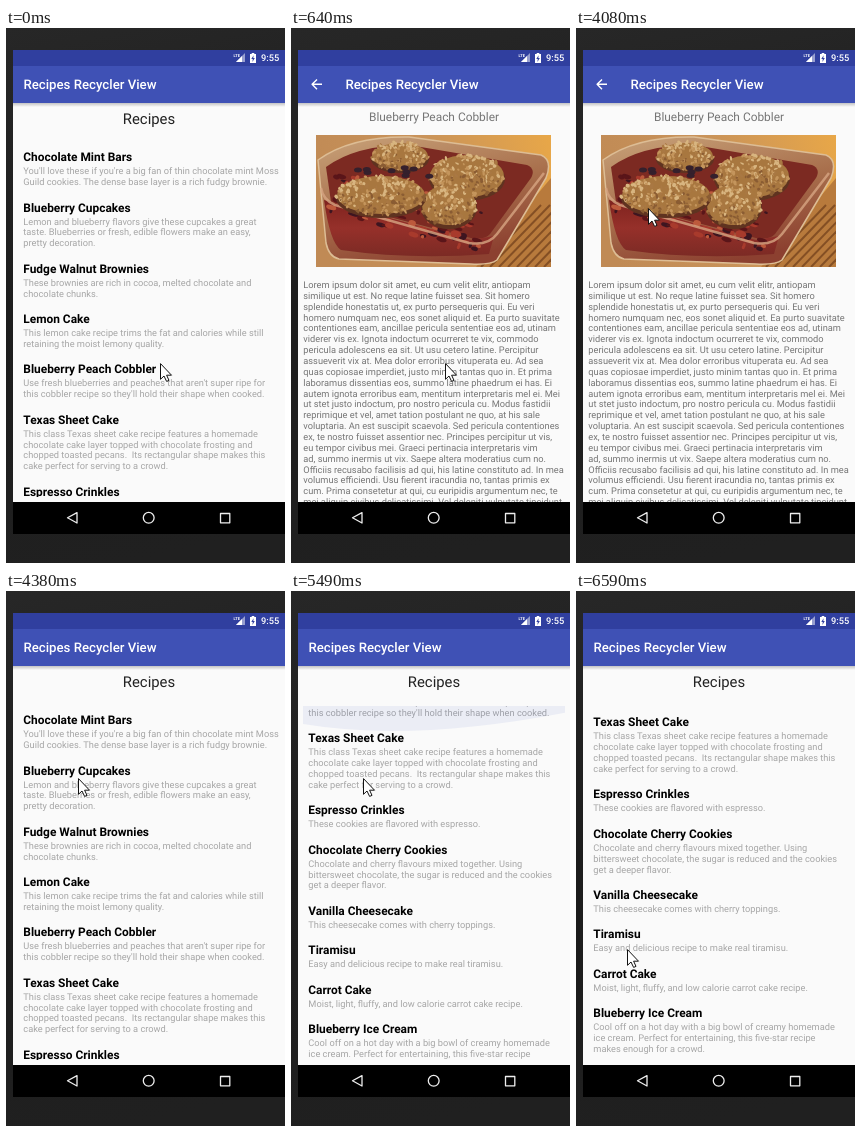
Write an HTML page with a canvas that moves like this. It is 279 px wide and 535 px high and loops after 8 s.

```html
<!DOCTYPE html>
<html lang="en">
<head>
<meta charset="utf-8">
<title>Recipes</title>
<style>
html, body { margin: 0; width: 100%; height: 100%; overflow: hidden; background: #202020; }
canvas { display: block; }
</style>
</head>
<body>
<canvas id="stage" width="279" height="535"></canvas>
<script>
const W = 279, H = 535, LOOP = 8000;
const DP = 0.6618;
const LINE = 14 * 1.172 * DP;
const SCREEN = { x: 7, top: 22, bottom: 474, w: 272 };
const LIST = { x: 12, y: 115, w: 262, h: 354 };
const SCROLL_END = 260.4;

const recipes = `Chocolate Mint Bars
You'll love these if you're a big fan of thin chocolate mint Moss
Guild cookies. The dense base layer is a rich fudgy brownie.

Blueberry Cupcakes
Lemon and blueberry flavors give these cupcakes a great
taste. Blueberries or fresh, edible flowers make an easy,
pretty decoration.

Fudge Walnut Brownies
These brownies are rich in cocoa, melted chocolate and
chocolate chunks.

Lemon Cake
This lemon cake recipe trims the fat and calories while still
retaining the moist lemony quality.

Blueberry Peach Cobbler
Use fresh blueberries and peaches that aren't super ripe for
this cobbler recipe so they'll hold their shape when cooked.

Texas Sheet Cake
This class Texas sheet cake recipe features a homemade
chocolate cake layer topped with chocolate frosting and
chopped toasted pecans.  Its rectangular shape makes this
cake perfect for serving to a crowd.

Espresso Crinkles
These cookies are flavored with espresso.

Chocolate Cherry Cookies
Chocolate and cherry flavours mixed together. Using
bittersweet chocolate, the sugar is reduced and the cookies
get a deeper flavor.

Vanilla Cheesecake
This cheesecake comes with cherry toppings.

Tiramisu
Easy and delicious recipe to make real tiramisu.

Carrot Cake
Moist, light, fluffy, and low calorie carrot cake recipe.

Blueberry Ice Cream
Cool off on a hot day with a big bowl of creamy homemade
ice cream. Perfect for entertaining, this five-star recipe
makes enough for a crowd.`.split("\n\n").map(entry => entry.split("\n"));

const article = `Lorem ipsum dolor sit amet, eu cum velit elitr, antiopam
similique ut est. No reque latine fuisset sea. Sit homero
splendide honestatis ut, ex purto persequeris qui. Eu veri
homero numquam nec, eos sonet aliquid et. Ea purto suavitate
contentiones eam, ancillae pericula sententiae eos ad, utinam
viderer vis ex. Ignota indoctum ocurreret te vix, commodo
pericula adolescens ea sit. Ut usu cetero latine. Percipitur
assueverit vix at. Mea dolor erroribus vituperata eu. Ad sea
quas copiosae imperdiet, justo minim tantas quo in. Et prima
laboramus dissentias eos, summo latine phaedrum ei has. Ei
autem ignota erroribus eam, mentitum interpretaris mel ei. Mei
ut stet justo indoctum, pro nostro pericula cu. Modus fastidii
reprimique et vel, amet tation postulant ne quo, at his sale
voluptaria. An est suscipit scaevola. Sed pericula contentiones
ex, te nostro fuisset assentior nec. Principes percipitur ut vis,
eu tempor civibus mei. Graeci pertinacia interpretaris vim
ad, summo inermis ut vix. Saepe altera moderatius cum no.
Officiis recusabo facilisis ad qui, his latine constituto ad. In mea
volumus efficiendi. Usu fierent iracundia no, tantas primis ex
cum. Prima consetetur at qui, cu euripidis argumentum nec, te
mei aliquip civibus delicatissimi. Vel deleniti vulputate tincidunt`.split("\n");

const clamp = p => Math.min(1, Math.max(0, p));
const lerp = (a, b, p) => a + (b - a) * p;
const easeOut = power => p => 1 - (1 - p) ** power;
const smooth = p => p ** 3 * (p * (p * 6 - 15) + 10);
const lateSmooth = p => smooth(p ** 1.25);

// Progress that advances in equal jumps, the first one right at the start
const stepped = (t, start, step, count) =>
  clamp((Math.floor((t - start) / step) + 1) / count);

const cursorHome = { x: 154, y: 335 };
const cursorMoves = [
  { start: 1450, step: 134, count: 6, x: 22, y: 47, ease: easeOut(2) },
  { start: 3780, step: 150, count: 3, x: 72, y: 180, ease: lateSmooth },
  { start: 4230, step: 150, count: 1, x: 72, y: 187, ease: smooth },
  { start: 5880, step: 142, count: 6, x: 51, y: 358, ease: smooth }
];

function cursorAt(t) {
  return cursorMoves.reduce((from, move) => {
    const p = move.ease(stepped(t, move.start, move.step, move.count));
    return { x: lerp(from.x, move.x, p), y: lerp(from.y, move.y, p) };
  }, cursorHome);
}

function listAt(t) {
  const p = stepped(t, 5250, 120, 5);
  return {
    scroll: SCROLL_END * easeOut(3.05)(p),
    topGlow: Math.sin(Math.PI * p),
    bottomGlow: p === 1 ? clamp((6280 - t) / 540) : 0
  };
}

const within = (t, from, to) => t >= from && t < to;

function makeLayer() {
  const canvas = document.createElement("canvas");
  canvas.width = W;
  canvas.height = H;
  return canvas.getContext("2d");
}

function text(c, str, x, y, sp, color, weight = 400, align = "left") {
  c.font = `${weight} ${sp * DP}px Roboto, sans-serif`;
  c.textRendering = "geometricPrecision";
  c.textAlign = align;
  c.fillStyle = color;
  c.fillText(str, x, y);
}

function path(c, d, fill, stroke, width = 1) {
  const p = new Path2D(d);
  c.lineJoin = "round";
  if (fill) { c.fillStyle = fill; c.fill(p); }
  if (stroke) { c.strokeStyle = stroke; c.lineWidth = width; c.stroke(p); }
}

function rect(c, x, y, w, h, fill) {
  c.fillStyle = fill;
  c.fillRect(x, y, w, h);
}

function ellipse(c, x, y, rx, ry, fill, angle = 0) {
  c.beginPath();
  c.ellipse(x, y, rx, ry, angle, 0, Math.PI * 2);
  c.fillStyle = fill;
  c.fill();
}

function gradient(c, x0, y0, x1, y1, ...colors) {
  const g = c.createLinearGradient(x0, y0, x1, y1);
  colors.forEach((color, i) => g.addColorStop(i / (colors.length - 1), color));
  return g;
}

function clipped(c, x, y, w, h, paint) {
  c.save();
  c.beginPath();
  c.rect(x, y, w, h);
  c.clip();
  paint();
  c.restore();
}

function randomizer(seed) {
  return () => (seed = (seed * 16807) % 2147483647) / 2147483647;
}

function drawPage(c, titleX) {
  const { x, w } = SCREEN;
  rect(c, x, 75, w, 399, "#fafafa");
  rect(c, x, 75, w, 4, gradient(c, 0, 75, 0, 79, "rgba(0,0,0,.22)", "rgba(0,0,0,0)"));
  rect(c, x, 22, w, 16, "#303f9f");
  rect(c, x, 38, w, 37, "#3f51b5");
  text(c, "Recipes Recycler View", titleX, 61.2, 20, "#fff", 500);
}

function drawGlow(c, edge, dir, strength) {
  const y = depth => edge + dir * depth * strength;
  path(c, `M12 ${edge}H274V${y(7)}Q120 ${y(38)} 12 ${y(19)}Z`, `rgba(63,81,181,${0.08 * strength})`);
}

function drawList(c, { scroll, topGlow, bottomGlow }) {
  drawPage(c, 17.4);
  text(c, "Recipes", 143, 95.6, 22.5, "#212121", 400, "center");
  clipped(c, LIST.x, LIST.y, LIST.w, LIST.h, () => {
    let y = 133.3 - scroll;
    for (const [title, ...lines] of recipes) {
      text(c, title, 17.3, y, 18, "#000", 700);
      lines.forEach((line, i) => text(c, line, 17.3, y + 13 + i * LINE, 14, "#a6a6a6"));
      y += 28.6 + lines.length * LINE;
    }
    drawGlow(c, LIST.y, 1, topGlow);
    drawGlow(c, LIST.y + LIST.h, -1, bottomGlow);
  });
}

function drawTable(c) {
  rect(c, 25, 107, 235, 132, gradient(c, 25, 180, 260, 107, "#c08a55", "#c9935a", "#e8a748"));
  path(c, "M260 150V239H185Z", "#b87a3c");
  for (let i = 0; i < 12; i++) {
    path(c, `M${190 + i * 9} 239l60 -62`, null, "rgba(90,45,18,.55)", 2);
  }
}

function drawCrumble(c, random, x, y, rx, ry) {
  const shades = ["#8a5c33", "#a97843", "#c4955c", "#d8b580"];
  ellipse(c, x, y + 3, rx, ry, "#5f3320");
  ellipse(c, x, y, rx - 1, ry - 1, "#a8773f");
  for (let i = 0; i < rx * 6; i++) {
    const angle = random() * Math.PI * 2, r = Math.sqrt(random());
    const dx = Math.cos(angle) * r, dy = Math.sin(angle) * r;
    const light = clamp(0.55 - dy * 0.4 + (random() - 0.5) * 0.9);
    ellipse(c, x + dx * rx, y + dy * ry, 0.8 + random() * 1.8, 0.7 + random() * 1.2,
      shades[Math.floor(light * 3.99)], random() * 3);
  }
}

function drawDish(c) {
  const random = randomizer(4711);
  drawTable(c);
  path(c, "M27 132Q60 108 118 109L250 127Q262 132 255 150L206 232Q200 237 180 236L48 231Q38 229 35 215Z",
    gradient(c, 100, 107, 130, 239, "#c39a72", "#a86f4c", "#8c4030"), "#ddbd95", 1.5);
  path(c, "M35 139Q65 117 118 117L236 137Q245 141 240 150L199 206Q194 212 180 210L40 174Z", "#7c2a22");
  path(c, "M33 172L180 212L203 208L198 226Q120 232 50 222Q39 215 33 172Z",
    gradient(c, 0, 170, 0, 230, "#7d211d", "#96302a", "#7a2a24"));
  for (let i = 0; i < 130; i++) {
    const u = random(), v = random();
    ellipse(c, 40 + u * 150, 140 + u * 40 + v * 45, 1.5 + random() * 4, 1 + random() * 2.5,
      ["#5a1519", "#a83a2c", "#bd5a3c", "#3d1520"][i % 4], 0.3);
  }
  path(c, "M30 160Q32 172 44 177L178 215Q197 218 206 206L253 145", null, "rgba(215,165,130,.8)", 2.5);
  drawCrumble(c, random, 109, 128, 29, 14);
  drawCrumble(c, random, 176, 148, 38, 22);
  drawCrumble(c, random, 158, 177, 28, 21);
  drawCrumble(c, random, 90, 167, 45, 20);
  for (let i = 0; i < 9; i++) {
    ellipse(c, 66 + random() * 75, 139 + random() * 10, 4, 2.5, "#35202c");
  }
}

function drawDetail(c) {
  drawPage(c, 54.4);
  path(c, "M31 56.3H21M26 51.4L21.1 56.3L26 61.2", null, "#fff", 1.4);
  text(c, "Blueberry Peach Cobbler", 143, 93, 18, "#757575", 400, "center");
  clipped(c, 25, 107, 235, 132, () => drawDish(c));
  clipped(c, SCREEN.x, 75, SCREEN.w, 399, () =>
    article.forEach((line, i) => text(c, line, 12.3, 260 + i * LINE, 14, "#757575")));
}

function drawStatus(c) {
  text(c, "LTE", 227.5, 28.8, 6, "#fff", 700);
  path(c, "M230 34H239V25Z", "rgba(255,255,255,.5)");
  path(c, "M230 34H236V28Z", "#fff");
  path(c, "M244 26H245.7V25H248.3V26H250V35H244Z", "#fff");
  path(c, "M247.6 27.2L245.3 31H246.8L246.4 34L248.8 30H247.3Z", "#303f9f");
  text(c, "9:55", 273.3, 33.4, 14, "#fff", 500, "right");
}

function drawNavIcons(c) {
  path(c, "M61.5 489.8L71 484.6V495Z", null, "#eee", 1.3);
  c.beginPath();
  c.arc(142.7, 489.8, 5.4, 0, Math.PI * 2);
  c.stroke();
  c.strokeRect(214.5, 485.5, 9.3, 9.3);
}

function drawCursor(c, { x, y }) {
  path(c, `M${x + 0.5} ${y + 0.6}v15.7l3.5 -3.3l2.6 5.4l2.4 -1l-2.4 -5.2h4.9Z`, "#fff", "#111");
}

const stage = document.getElementById("stage").getContext("2d");
const detail = makeLayer();
drawDetail(detail);
const backdrop = gradient(stage, 0, 0, 120, H, "#272727", "#1d1d1d", "#202020");

function draw(t) {
  const detailShown = within(t, 500, 4380);
  const sliding = within(t, 500, 640) || within(t, 4230, 4380);
  rect(stage, 0, 0, W, H, backdrop);
  rect(stage, SCREEN.x, SCREEN.bottom, SCREEN.w, 32, "#000");
  if (!detailShown || sliding) drawList(stage, listAt(t));
  if (detailShown) {
    stage.globalAlpha = sliding ? 0.6 : 1;
    stage.drawImage(detail.canvas, 0, sliding ? 8 : 0);
    stage.globalAlpha = 1;
  }
  if (within(t, 3080, 3350)) ellipse(stage, 24.5, 54.5, 10.5, 10.5, "rgba(255,255,255,.2)");
  drawStatus(stage);
  drawNavIcons(stage);
  drawCursor(stage, cursorAt(t));
}

const start = performance.now();
function tick() {
  draw((performance.now() - start) % LOOP);
  requestAnimationFrame(tick);
}
tick();
</script>
</body>
</html>
```
